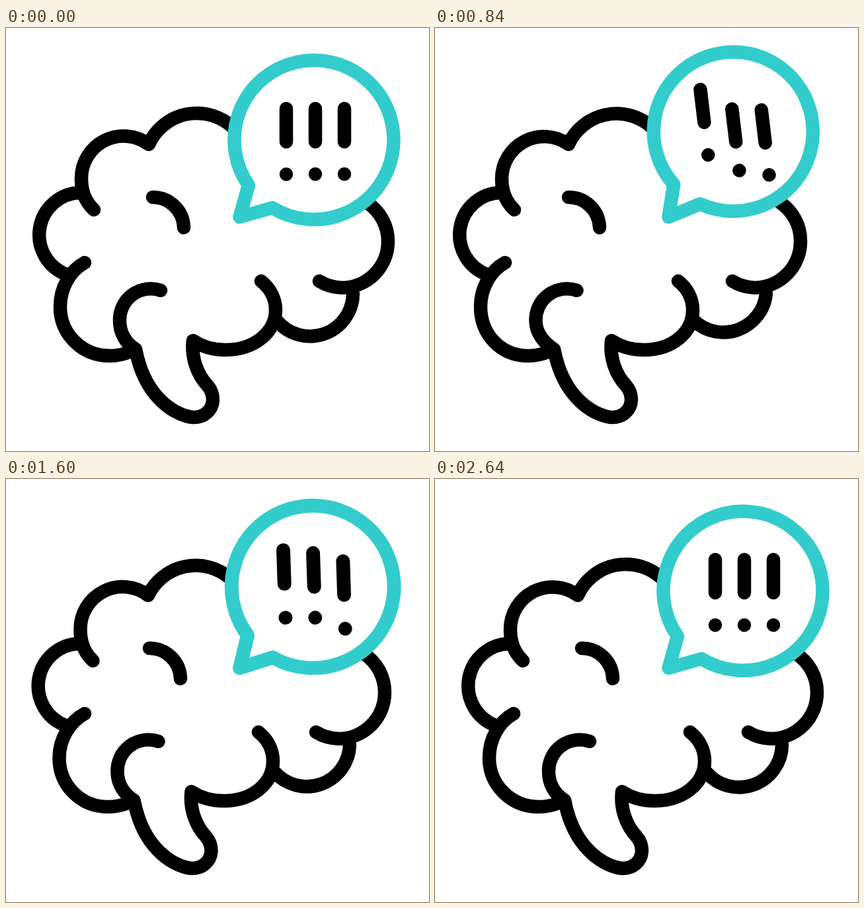
Animation of 640 by 640 pixels, one loop 2.8 s. Source, as an HTML page:

```html
<!DOCTYPE html>
<html lang="en">
<head>
<meta charset="utf-8">
<title>Stressed brain</title>
<style>
  html, body { margin: 0; width: 100%; height: 100%; overflow: hidden; background: #fff; }
  svg { display: block; width: 100%; height: 100%; fill: none; stroke: #000; stroke-width: 20.5;
        stroke-linecap: round; stroke-linejoin: round; }
  #ring { fill: #fff; stroke: #3cc; }
</style>
</head>
<body>
<svg viewBox="0 0 640 640">
  <path id="brain"/>
  <g id="bubble">
    <path id="ring" d="M367 238A120.5 120.5 0 1 1 403 272L353.5 286Z"/>
    <path id="marks"/>
  </g>
</svg>
<script>
const LOOP = 2800, STEP = 40;
const byId = id => document.getElementById(id);

// A lowercase letter before an x coordinate names the group that moves it.
const BRAIN = `
  Ml113 249 A64 64 0 0 0 l92 373
  Mb119 355 Cb97 367 l82 393 l82 422 Cl82 463 s115 496 s157 496 Cs168 496 s178 494 s187 490
  Ml133 275 Cl120 263 l114 247 l114 228 A64 64 0 0 1 v216 176
  A80 80 0 0 1 t343 150 Ct400 105 r500 140 r546 264
  A70 70 0 0 1 e578 323 A70 70 0 0 1 r508 393 A70 70 0 0 1 r474 383
  Mr525 402 A65 65 0 0 1 m410 443
  Mm386 383 Cm400 394 m408 410 m408 427 Cm408 460 s376 487 s332 487 Cs314 487 s298 483 s283 473
  Cs280 500 s290 525 s305 541 Cs311 548 s313 555 s313 563 Cs312 580 s298 590 s282 589
  Cs262 587 s211 565 s196 486
  Mc234 397 A47 47 0 0 0 c172 443 Cc172 461 s181 477 s196 486
  Mi222 256 A47 47 0 0 1 i269 302`;

// Sideways position of each group as the swing passes these times.
const PASS = [560, 840, 1160, 1600];
const GROUPS = {
  l: [-5, -13, 5, -1.5],
  b: [0, -13, 6, 0],
  v: [-10, -14, 6, -1],
  t: [-16, -15, -1, -4],
  i: [-5, -20, 10, -5],
  c: [-2.5, -19.5, 15, -3.5],
  s: [-1.5, -16, 16, -2.5],
  m: [-13, -18, 0, -4],
  r: [-15, -24, 0, -5],
  e: [-19, -25, -5, -5]
};

// Each track is a list of [time, value] keys.
const SWING = [[0, 0], [360, 38], [720, -41], [1000, 24], [1320, -19], [1680, 0]];
const TILT = [[0, 0], [440, 12], [760, -12], [1000, 8], [1340, -3.3], [1520, -3], [1800, 2.5], [2100, 0]];
const SCALE = [[0, 1], [560, .957], [840, 1], [1160, 1.02], [1600, 1.02], [1920, 1]];
const BOUNCE = [
  [[0, 0], [580, 20], [850, -22], [1180, 12], [1560, -9], [1900, 3], [2200, 0]],
  [[100, 0], [740, 20], [1110, -18], [1400, 12], [1700, -8], [2040, 4], [2400, 0]],
  [[200, 0], [860, 20], [1340, -14], [1640, 12], [1950, -11], [2240, 4], [2600, 0]]
];
const DOT_LEAD = 40;

function track(keys, t) {
  const next = keys.findIndex(key => key[0] > t);
  if (next < 0) return keys[keys.length - 1][1];
  if (next === 0) return keys[0][1];
  const [t0, a] = keys[next - 1], [t1, b] = keys[next];
  const p = (t - t0) / (t1 - t0);
  return a + (b - a) * p * p * (3 - 2 * p);
}

const offsets = {};
for (const [name, xs] of Object.entries(GROUPS))
  offsets[name] = [[0, 0], ...PASS.map((t, i) => [t, xs[i] - track(SWING, t)]), [1840, 0]];

function draw(t) {
  const swing = track(SWING, t), shift = {};
  for (const name in offsets) shift[name] = swing + track(offsets[name], t);
  byId("brain").setAttribute("d",
    BRAIN.replace(/([a-z])(\d+)/g, (_, name, x) => (+x + shift[name]).toFixed(2)));

  byId("bubble").setAttribute("transform",
    `translate(353 286) rotate(${track(TILT, t)}) scale(${track(SCALE, t)}) translate(-353 -286)`);
  byId("marks").setAttribute("d", BOUNCE.map((keys, i) => {
    const x = 424 + 44 * i;
    const bar = 122 + track(keys, t), dot = 221 + track(keys, t + DOT_LEAD);
    return `M${x} ${bar}v50M${x} ${dot}h.01`;
  }).join(""));
}

function tick() {
  draw(Math.floor(performance.now() % LOOP / STEP) * STEP);
  requestAnimationFrame(tick);
}
tick();
</script>
</body>
</html>
```
